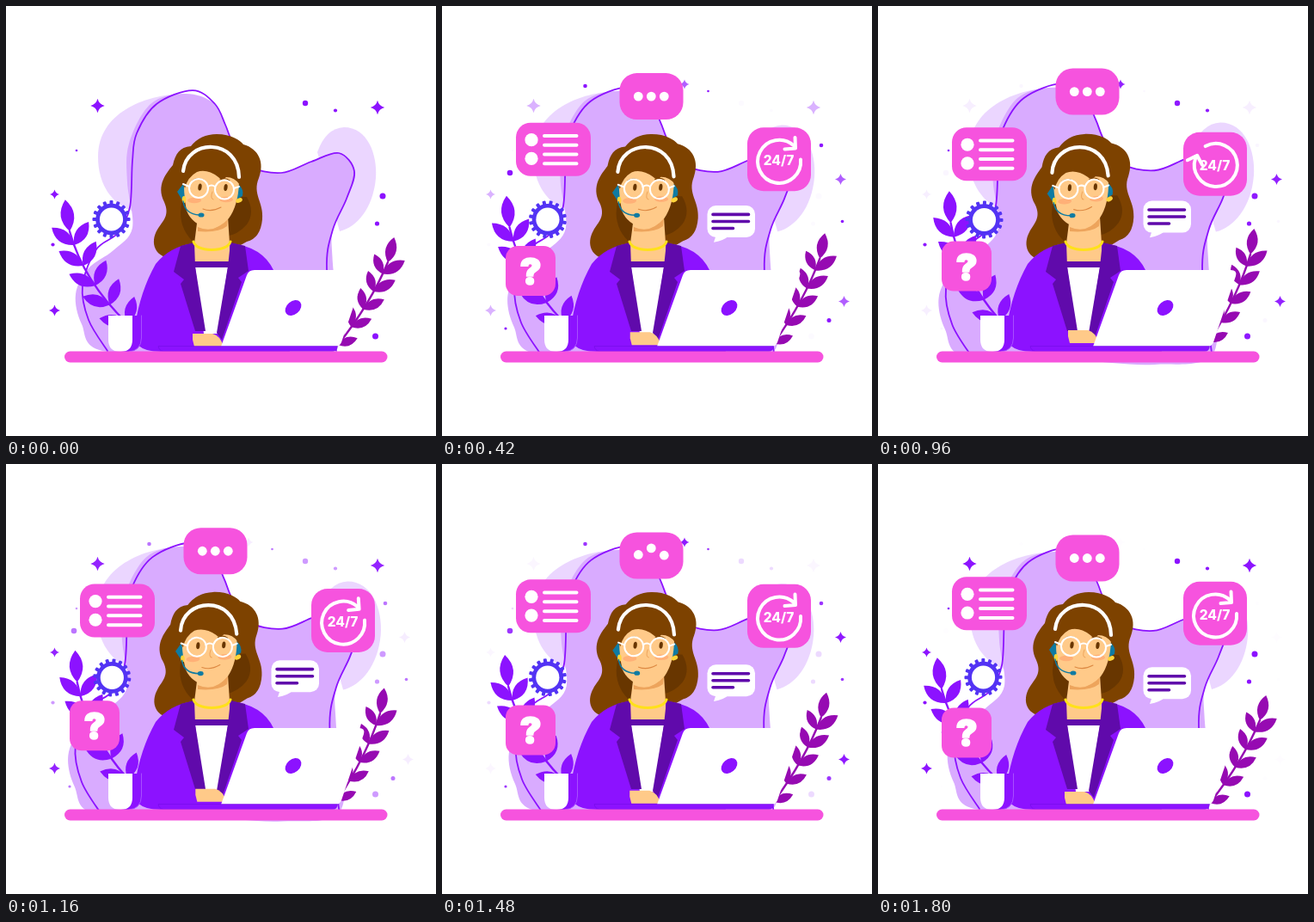
An HTML page that plays this animation: 500x500 px, repeating every 1820 ms.

```html
<!DOCTYPE html>
<html lang="en">
<head>
<meta charset="utf-8">
<title>Support desk</title>
<style>
html, body { margin: 0; width: 100%; height: 100%; overflow: hidden; background: #fff; }
svg { display: block; width: 100vw; height: 100vh; }
text { font-family: Inter, "Open Sans", sans-serif; fill: #fff; text-anchor: middle; }
</style>
</head>
<body>
<svg id="stage" viewBox="0 0 500 500"></svg>
<script>
const LOOP = 1820, STEP = 20, POP = 240;
const PURPLE = '#8c12ff', DARK = '#600aab', PINK = '#f653de', SKIN = '#ffca89', HAIR = '#7d4200';
const SHADE = '#683600', TEAL = '#0f7ba2', HALO = '#ebd6ff', LILAC = '#d9abff', BLUE = '#5333f4';

// Catmull-Rom spline through key points
function spline(pts, closed) {
  const n = pts.length;
  const at = i => closed ? pts[(i + n) % n] : pts[Math.max(0, Math.min(n - 1, i))];
  let d = 'M' + pts[0];
  for (let i = 0; i < (closed ? n : n - 1); i++) {
    const [a, b, c, e] = [at(i - 1), at(i), at(i + 1), at(i + 2)];
    const leave = k => b[k] + (c[k] - a[k]) / 6, arrive = k => c[k] - (e[k] - b[k]) / 6;
    d += `C${leave(0)},${leave(1)} ${arrive(0)},${arrive(1)} ${c}`;
  }
  return d + (closed ? 'Z' : '');
}

const path = (d, fill, more = '') => `<path d="${d}" fill="${fill}" ${more}/>`;
const line = (d, color, width, more = '') =>
  path(d, 'none', `stroke="${color}" stroke-width="${width}" stroke-linecap="round" stroke-linejoin="round" ${more}`);
const circle = (x, y, r, fill, more = '') => `<circle cx="${x}" cy="${y}" r="${r}" fill="${fill}" ${more}/>`;
const oval = (x, y, rx, ry, fill, turn = 0) =>
  `<ellipse cx="${x}" cy="${y}" rx="${rx}" ry="${ry}" fill="${fill}" transform="rotate(${turn} ${x} ${y})"/>`;
const card = (x, y, w, h, r, fill = PINK) => `<rect x="${x}" y="${y}" width="${w}" height="${h}" rx="${r}" fill="${fill}"/>`;
const group = (id, ...parts) => `<g id="${id}">${parts.join('')}</g>`;
const repeat = (n, make) => Array.from({ length: n }, (_, i) => make(i)).join('');

function leaf([x, y], degrees, length) {
  const a = degrees * Math.PI / 180, dx = length * Math.cos(a), dy = length * Math.sin(a);
  const side = s => `${x + dx / 2 - s * dy} ${y + dy / 2 + s * dx}`;
  return `M${x} ${y}Q${side(.42)} ${x + dx} ${y + dy}Q${side(-.42)} ${x} ${y}Z`;
}

// A bent stem with leaf pairs that open wider towards the root
function plant(id, color, top, bend, root, tip, pair) {
  const along = t => [0, 1].map(k => (1 - t) ** 2 * top[k] + 2 * t * (1 - t) * bend[k] + t * t * root[k]);
  const leaves = repeat(5, i => pair.map(([angle, spread, length, shrink]) =>
    leaf(along(.14 + .215 * i), angle + spread * i, length - shrink * i)).join(''));
  return group(id, line(`M${top}Q${bend} ${root}`, color, 2.4), path(leaf(top, ...tip) + leaves, color));
}

function star([x, y, r]) {
  const k = r * .2;
  return `M${x} ${y - r}Q${x + k} ${y - k} ${x + r} ${y}Q${x + k} ${y + k} ${x} ${y + r}Q${x - k} ${y + k} ${x - r} ${y}Q${x - k} ${y - k} ${x} ${y - r}Z`;
}
const stars = (id, ...list) => group(id, path(list.map(star).join(''), PURPLE));
const specks = (id, ...list) => group(id, ...list.map(([x, y, r]) => circle(x, y, r, PURPLE)));

// The outline and the blob share the right-hand ridge.
const ridge = [[255,138], [264,160], [282,186], [320,194], [355,181], [387,171], [405,192], [396,224], [380,260]];
const outline = spline([[118,401], [96,365], [89,325], [105,283], [130,264], [144,234], [147,180], [152,148], [175,114], [217,98], [243,114],
  ...ridge, [373,306], [384,401]]);
const blob = spline([[112,401], [88,370], [81,335], [96,305], [125,284], [147,258], [141,205], [143,160], [168,114], [208,102], [240,112],
  ...ridge, [380,300], [386,395], [320,409], [230,404]], true);
const haloLeft = 'M207 102C160 103 107 125 107 175C107 210 125 230 145 238L200 200Z';
const haloRight = 'M393 141C420 141 432 172 430 200C427 235 408 257 388 262L362 170Q372 142 393 141Z';

const gear = group('gear', group('teeth', repeat(16, i =>
  `<rect x="-2" y="-22" width="4" height="7" rx="1" fill="${BLUE}" transform="rotate(${i * 22.5})"/>`)),
  circle(0, 0, 18.3, BLUE), circle(0, 0, 13.6, '#fff'));

const leftPlant = plant('plantLeft', PURPLE, [74,262], [90,320], [141,369], [-98, 37], [[-142, -7, 33, 0], [-58, -4.3, 32, 0]]);
const rightPlant = plant('plantRight', '#960ab2', [444,298], [424,346], [386,394], [-76, 30], [[-31, 3, 30, 1.5], [-113, 8, 25, 0]]);

const hairBack =
  path('M245 149C262 149 272 156 276 161C294 166 301 182 294 200C286 219 300 228 298 248Q296 270 280 274L255 288L200 294C172 295 167 275 176 260C182 250 191 244 184 228C174 208 187 194 194 185C197 172 202 164 215 163Q226 149 245 149Z', HAIR) +
  path('M205 222H280Q290 240 280 254Q270 266 255 268L220 276Q203 262 203 240Z', SHADE);

const hand = group('hand', path('M217 388V381H240Q249 383 253 396H219Z', SKIN));
const torso =
  path('M217 276Q190 280 174 300Q156 332 150 372Q143 402 180 402H330L311 307Q298 280 262 276Z', PURPLE) +
  path('M223 245H258L260 276V300H219V276Z', SKIN) +
  path('M223 257Q243 266 258 246L257 256Q247 264 223 262Z', '#eda45c') +
  path('M218 297H260L258 306H220Z', DARK) +
  path('M220 304H258L246 381H230Z', '#fff') +
  path('M219 275L203 279L195 309L207 318L203 323L220 378H232L220 303Z', DARK) +
  path('M261 275L278 279L282 308L270 316L274 321L251 388L245 380L258 303Z', DARK) +
  line('M218 274Q221 283 239 283.5Q258 283 261 274', '#ffe11a', 3) + hand;

const head =
  path('M206 207L210 223L205 226L199 216Z', TEAL) + path('M270 207Q277 213 275 221L268 225Z', TEAL) +
  path('M207 190Q208 165 238 165Q270 168 271 205Q270 232 259 247Q247 260 234 258Q216 253 210 238Q206 220 207 190Z', SKIN) +
  oval(207, 225, 2.3, 4, '#ffd43a') + oval(271, 226, 4, 2.6, '#ffd43a', -25) +
  path('M205 203Q203 164 238 162Q273 167 272 208Q266 199 256 199Q251 204 247 199Q234 189 222 193Q211 199 208 212Z', HAIR) +
  line('M206 192C210 154 270 153 271 199', '#fff', 4.2) +
  oval(219, 226, 8, 3.3, '#ffb077') + oval(256, 225, 8, 3.3, '#ffb077') +
  line('M217 203Q222 199 229 202M249 202Q255 199 260 203', HAIR, 1.1) +
  oval(225.5, 210.5, 2.1, 4, SHADE, 8) + oval(255.5, 211, 2.1, 4, SHADE, 8) +
  line('M240 216Q237 224 241 225', '#eda45c', 1) +
  line('M229 236Q239 240 250 234', '#dd8943', 1.1) +
  circle(224, 212, 11, 'none', 'stroke="#fff" stroke-width="2"') + circle(254, 213.5, 11, 'none', 'stroke="#fff" stroke-width="2"') +
  line('M235 210Q239 207 243 210M213 210L206 207M265 212L271 210', '#fff', 2) +
  line('M206 227Q208 242 225 243', TEAL, 1.5) + oval(227, 243, 3.5, 2.6, TEAL);

const mug = path('M146 360H157.5V386Q157 401 143 402H134Z', PURPLE) + line('M157.5 360V386Q157 401 143 402', '#b56bff', .7) +
  path('M119 360H147V388Q147 402 133 402Q119 402 119 388Z', '#fff');
const laptop =
  path('M289 307H410Q418 307 416 314L390 391Q388 396 383 396H250L280 313Q282 307 289 307Z', '#fff') +
  oval(334, 351, 10.5, 7.6, PURPLE, -40) +
  path('M177 395.5H385.5Q385 401.5 380 401.5H183Q178 401 177 395.5Z', PURPLE, 'stroke="#6d0bdc" stroke-width=".5"');

const listCard = card(86, 131.3, 87, 62, 17) + repeat(2, i => circle(104, 151.3 + 21.7 * i, 7.6, '#fff')) +
  line(repeat(4, i => `M119 ${146.5 + 10.8 * i}H156.5`), '#fff', 4);
const clockCard = card(355, 136.8, 74, 74, 19) +
  group('arrow', line('M417 174A25 25 0 1 1 409 158M410.5 148.5L411 161L398.5 162', '#fff', 4)) +
  '<text x="391.5" y="181" font-size="15.5" font-weight="800">24/7</text>';
const dotsCard = card(206.5, 82.5, 74, 54, 20) + repeat(3, i => circle(228.3 + 15 * i, 109.5, 5.4, '#fff', `id="dot${i}"`));
const helpCard = card(74, 283.5, 58, 58, 14) +
  group('mark', '<text x="103" y="328.5" font-size="42" font-weight="900" stroke="#fff" stroke-width="1.6">?</text>');
const chatCard = card(308.5, 236.3, 55.5, 37, 10, '#fff') + path('M319 270L316 279Q328 277 334 271Z', '#fff') +
  line('M315 246.7H356.5M315 254.8H356.5M315 262.8H338.5', DARK, 3.6);

// name, content, centre and vertical travel of each floating card
const CARDS = [
  ['list', listCard, 129.5, 162, 10], ['clock', clockCard, 392, 174, 10], ['dots', dotsCard, 243.5, 109.5, -10],
  ['help', helpCard, 103, 312.5, -10], ['chat', chatCard, 336, 255, -9.8]];

document.getElementById('stage').innerHTML =
  path(haloLeft, HALO, 'id="haloLeft"') +
  group('backdrop', path(haloRight, HALO), path(blob, LILAC), line(outline, PURPLE, 1.75)) +
  stars('starsA', [106.5,116,8.2], [432,118,8.2], [56.5,219,5.5], [56.5,354,6.5]) +
  stars('starsB', [282,91,5.5], [463.5,201.5,6.5], [467.5,343.5,6.5]) +
  specks('specksA', [348,113,3.2], [383,121.5,2.1], [438,221,3.5], [431.5,253,2.6], [429.5,384,3.5], [82,168,1.3], [54.5,277.5,2.1]) +
  specks('specksB', [166.5,93,2.3], [309.5,99,1.3], [79,194,3.3], [441,162,2.3], [465.5,250.5,1.8], [450,365.5,2.5], [74,375,1.6]) +
  leftPlant + gear + rightPlant + group('hair', hairBack) + torso + group('head', head) + mug + laptop +
  card(68, 401.5, 375.5, 13, 6.5) + CARDS.map(([id, body]) => group(id, body)).join('');

const set = (id, name, value) => document.getElementById(id).setAttribute(name, value);
const move = (id, value) => set(id, 'transform', value);
const grow = (id, x, y, sx, sy) => move(id, `translate(${x} ${y}) scale(${sx} ${sy}) translate(${-x} ${-y})`);
const clamp = x => Math.max(0, Math.min(1, x));
const wave = (t, turns) => (1 + Math.cos(2 * Math.PI * turns * t / LOOP)) / 2;
const hop = (t, start) => Math.sin(Math.PI * clamp((t - start) / 200)) ** 2;

function draw(t) {
  const p = 1 - wave(t, 1), swell = 1 + .05 * p;
  grow('backdrop', 290, 250, swell, swell);
  grow('haloLeft', 290, 250, 1 + .01 * p, swell);

  move('plantLeft', `rotate(${5.4 * p} 184 370)`);
  move('plantRight', `rotate(${-5.9 * p} 347 400)`);
  move('hair', `rotate(${-2.6 * p} 240 262)`);
  move('head', `rotate(${-3 * p} 240 262)`);
  move('hand', `translate(${4 * p} ${-4 * p})`);
  move('gear', `translate(${122.5 + p} ${248 + .5 * p})`);
  move('teeth', `rotate(${45 * t / LOOP})`);

  set('starsA', 'opacity', wave(t, 3));
  set('starsB', 'opacity', 1 - wave(t, 3));
  set('specksA', 'opacity', wave(t, 2));
  set('specksB', 'opacity', 1 - wave(t, 2));

  const scale = 1 - (1 - clamp(t / POP)) ** 3;
  for (const [id, , x, y, travel] of CARDS)
    move(id, `translate(${x} ${y + travel * p}) scale(${scale}) translate(${-x} ${-y})`);

  for (let i = 0; i < 3; i++)
    move('dot' + i, `translate(0 ${-8.6 * (hop(t, 570 + 84 * i) + hop(t, 1302 + 84 * i))})`);
  const turn = clamp((t - 594) / 590);
  move('arrow', `rotate(${180 * (1 - Math.cos(Math.PI * turn))} 392 175.5)`);
  move('mark', `rotate(${-9 * Math.sin(4 * Math.PI * clamp((t - 580) / 320))} 103 312.5)`);
}

const began = performance.now();
function tick() {
  const t = (performance.now() - began) % LOOP;
  draw(Math.floor(t / STEP) * STEP);
  requestAnimationFrame(tick);
}
draw(0);
requestAnimationFrame(tick);
</script>
</body>
</html>
```
